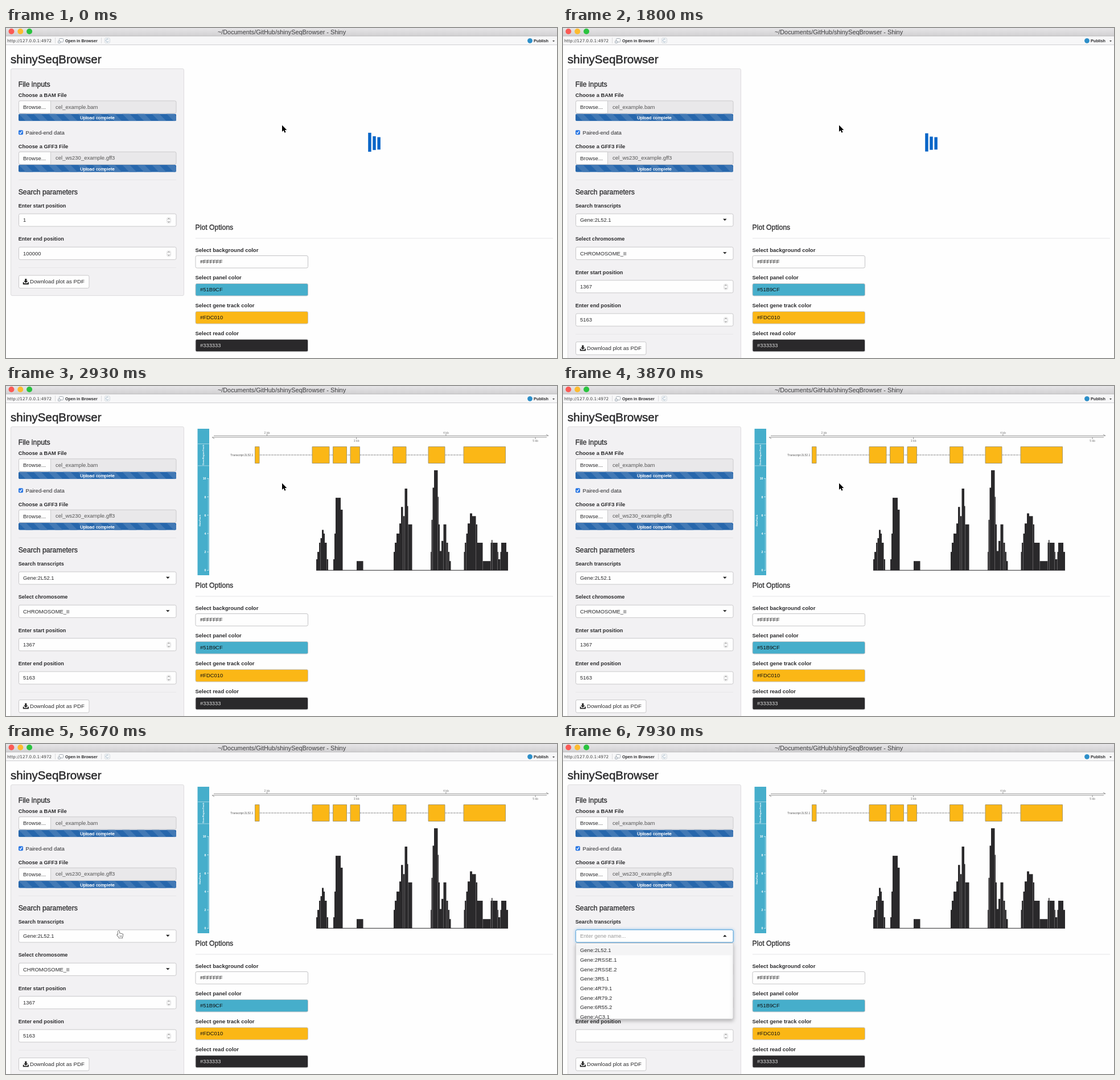
An HTML page with a canvas that plays this animation: 968x579 px, repeating every 8 s.

```html
<!DOCTYPE html>
<html lang="en">
<head>
<meta charset="utf-8">
<title>shinySeqBrowser</title>
<style>
  html, body { margin: 0; width: 100%; height: 100%; overflow: hidden; background: #fefefe; }
  canvas { display: block; }
</style>
</head>
<body>
<canvas id="stage" width="968" height="579"></canvas>
<script>
const ctx = document.getElementById('stage').getContext('2d');
const SANS = '"Liberation Sans", Arial, sans-serif';
const LOOP = 8000;
// Moments (ms) at which the app changes state
const FORM = 470, FILLED = 1330, PLOT = 2740, OPEN = 6400, CLEARED = 7200;
const MOVE_START = 4628, MOVE_END = 5478;

const BLUE = '#46aecb', GOLD = '#fbb716', DARK = '#2a292b', INK = '#2b2b2d';

const GENES = ['2L52.1', '2RSSE.1', '2RSSE.2', '3R5.1', '4R79.1', '4R79.2', '6R55.2', 'AC3.1'];
const EXONS = [[437.5, 445], [538, 568], [574.5, 598.5], [605, 621.5], [679.5, 703], [742, 771], [804, 877.5]];
// Each peak: x, height in reads, x, height, ..., closing x
const PEAKS = [
  [545, 1.2, 547, 2, 550, 3, 552.5, 3.5, 555, 4.4, 558, 4, 560, 3, 563.5, 1.2, 566],
  [575, 1.2, 577, 4, 579, 7.9, 588, 6.6, 591.5],
  [616, 1, 627.5],
  [681, 2, 683, 3, 686, 4, 691, 5.1, 694, 6.9, 697.5, 5.9, 700.5, 8.9, 705, 7, 706.5, 5, 713.5],
  [746, 2, 747.5, 5.5, 749.5, 9, 752, 10.9, 758.5, 8, 760, 5, 762, 2.1, 765, 3.2, 768.5, 5, 773.5, 3, 776.5, 2, 779, 1, 781.5],
  [804.5, 2, 806, 3, 808.5, 4, 811, 5.1, 815, 6.2, 819, 5.9, 825.5, 5, 828, 3, 837.5, 1, 851.5, 3,
   853, 3.3, 854.5, 3, 863.5, 2, 865, 1.2, 868.5, 2, 870, 3, 879, 2, 882]
];

const smooth = u => { u = Math.min(1, Math.max(0, u)); return u * u * (3 - 2 * u); };

function text(str, x, y, size, { color = INK, weight = 400, align = 'left', family = SANS, thicken = 0 } = {}) {
  ctx.font = `${weight} ${size}px ${family}`;
  ctx.textAlign = align;
  ctx.fillStyle = ctx.strokeStyle = color;
  ctx.fillText(str, x, y);
  if (thicken) { ctx.lineWidth = thicken; ctx.strokeText(str, x, y); }
}

function rect(x, y, w, h, color) {
  ctx.fillStyle = color;
  ctx.fillRect(x, y, w, h);
}

function box(x, y, w, h, fill, stroke, radius = 2.5) {
  ctx.beginPath();
  ctx.roundRect(x, y, w, h, radius);
  if (fill) { ctx.fillStyle = fill; ctx.fill(); }
  if (stroke) { ctx.strokeStyle = stroke; ctx.lineWidth = 1; ctx.stroke(); }
}

function line(points, color, width = 1) {
  ctx.beginPath();
  points.forEach(([x, y]) => ctx.lineTo(x, y));
  ctx.strokeStyle = color;
  ctx.lineWidth = width;
  ctx.stroke();
}

function shape(points, color) {
  ctx.beginPath();
  points.forEach(([x, y]) => ctx.lineTo(x, y));
  ctx.fillStyle = color;
  ctx.fill();
}

function disc(x, y, r, color) {
  ctx.beginPath();
  ctx.arc(x, y, r, 0, 7);
  ctx.fillStyle = color;
  ctx.fill();
}

// dir 1 points down, -1 points up
const caret = (x, y, w, dir = 1) =>
  shape([[x - w, y - dir * w / 2], [x + w, y - dir * w / 2], [x, y + dir * w / 2]], '#222');

const label = (str, x, y, size = 9.5) => text(str, x, y, size, { weight: 700 });
const heading = (str, x, y, size = 12.25) => text(str, x, y, size, { thicken: size / 40 });

function windowBars() {
  const bar = ctx.createLinearGradient(0, 0, 0, 14);
  bar.addColorStop(0, '#e6e5e7');
  bar.addColorStop(1, '#d1d0d2');
  rect(0, 0, 968, 14, bar);
  rect(0, 14, 968, 15, '#f7f7f8');
  rect(0, 13.5, 968, 1, '#b9b8ba');
  rect(0, 29, 968, 1, '#d0d0d2');
  ['#fb5a55', '#fcbb2f', '#2ac33f'].forEach((c, i) => disc(9.5 + i * 15.8, 6, 5, c));
  text('~/Documents/GitHub/shinySeqBrowser - Shiny', 484.5, 10.5, 10.85, { align: 'center', color: '#3c3c3e' });
  text('http://127.0.0.1:4972', 2, 25, 7.3, { family: '"DejaVu Sans", sans-serif', color: '#444' });
  rect(86, 17, 1, 10, '#dcdcde');
  rect(167, 17, 1, 10, '#dcdcde');
  box(93.5, 18.5, 7, 6, '#fff', '#a3abb3', 1);
  box(91.5, 22.5, 4, 4, '#e4e9ee', '#a3abb3', 1);
  text('Open in Browser', 104, 25, 7.1, { weight: 700 });
  box(173.5, 17.5, 9, 9, '#f4f6f8', '#d5dbe0', 2);
  ctx.beginPath();
  ctx.arc(178, 22, 2.6, 0.4, 5.4);
  ctx.strokeStyle = '#a9bccb';
  ctx.stroke();
  disc(920.5, 22.3, 4.4, '#2d8fc9');
  text('Publish', 927, 25, 7.2, { weight: 700 });
  caret(962, 23, 2);
}

function fileInput(y, name) {
  box(22.5, y, 276.5, 22, '#e9e8ea', '#cbcacc');
  box(22.5, y, 56, 22, '#fefefe', '#cbcacc', [2.5, 0, 0, 2.5]);
  text('Browse...', 30, y + 14.3, 9.55);
  text(name, 87, y + 13.7, 9.5, { color: '#555' });
  const top = y + 22.8, h = 12.7;
  ctx.save();
  ctx.beginPath();
  ctx.roundRect(22, top, 277, h, 2.5);
  ctx.clip();
  rect(22, top, 277, h, '#2767ac');
  for (let x = 22 - 26; x < 299; x += 26)
    shape([[x, top], [x + 13, top], [x + 13 + h, top + h], [x + h, top + h]], '#4279b5');
  ctx.restore();
  text('Upload complete', 160.3, top + 9.4, 8.1, { align: 'center', color: '#fff', thicken: 0.25 });
}

function field(i, title, value, kind, focused) {
  const y = 326 + i * 58.35, mid = y + 11;
  label(title, 21.7, y - 11, 9.15);
  if (focused) {
    ctx.save();
    ctx.shadowColor = 'rgba(102,175,233,.7)';
    ctx.shadowBlur = 5;
    box(22.5, y, 276.5, 22, '#fff', '#62a9dc');
    ctx.restore();
  }
  box(22.5, y, 276.5, 22, '#fefefe', focused ? '#62a9dc' : '#c9c8ca');
  const hint = value.endsWith('...');
  text(value, 30, mid + 3.2, 9.45, { color: hint ? '#999' : INK });
  if (kind === 'select') return caret(284.3, mid - 0.5, 3.3, focused ? -1 : 1);
  box(282.5, mid - 4.5, 7, 10, '#f8f8f8', '#dededf', 3);
  for (const d of [-1, 1])
    line([[284.2, mid + 0.5 + d * 1.8], [286, mid + 0.5 + d * 3.6], [287.8, mid + 0.5 + d * 1.8]], '#666', 0.9);
}

function downloadButton(y) {
  rect(22, y - 14, 277, 1, '#e7e6e8');
  box(22.5, y, 123.5, 22.5, '#fefefe', '#c9c8ca');
  const m = y + 11;
  rect(33.3, m - 5, 3, 4, '#222');
  shape([[31, m - 1.2], [38.6, m - 1.2], [34.8, m + 2.6]], '#222');
  line([[30.7, m + 1], [30.7, m + 4], [39, m + 4], [39, m + 1]], '#222', 1.8);
  text('Download plot as PDF', 42, m + 3.3, 9.65);
}

function sidebar(t) {
  const full = t >= FORM, filled = t >= FILLED && t < CLEARED;
  heading('shinySeqBrowser', 8, 61.5, 20.5);
  box(8.5, 71.5, 304, full ? 515 : 398, '#f2f1f3', '#dddcde');
  heading('File inputs', 21.7, 102.5);
  label('Choose a BAM File', 21.7, 121, 9.4);
  fileInput(127.8, 'cel_example.bam');
  box(22, 179.3, 8, 8, '#2b78e4', null, 1.8);
  line([[23.8, 183.4], [25.4, 185.2], [28.2, 181.2]], '#fff', 1.2);
  text('Paired-end data', 34.5, 186.5, 9.6);
  label('Choose a GFF3 File', 21.7, 210.5, 9.4);
  fileInput(217.3, 'cel_ws230_example.gff3');
  rect(22, 266, 277, 1, '#e7e6e8');
  heading('Search parameters', 21.7, 291.5);
  if (!full) {
    field(0, 'Enter start position', '1');
    field(1, 'Enter end position', '100000');
    return downloadButton(434);
  }
  field(0, 'Search transcripts', t < CLEARED ? 'Gene:2L52.1' : 'Enter gene name...', 'select', t >= OPEN);
  field(1, 'Select chromosome', t < FILLED ? 'CHROMOSOME_I' : 'CHROMOSOME_II', 'select');
  field(2, 'Enter start position', filled ? '1367' : '');
  field(3, 'Enter end position', filled ? '5163' : '');
  downloadButton(550.7);
  if (t >= OPEN) dropdown();
}

function dropdown() {
  ctx.save();
  ctx.shadowColor = 'rgba(0,0,0,.25)';
  ctx.shadowBlur = 6;
  ctx.shadowOffsetY = 3;
  box(22.5, 349.5, 276.5, 133, '#fefefe', '#cfced0', [0, 0, 2.5, 2.5]);
  ctx.restore();
  ctx.save();
  ctx.beginPath();
  ctx.rect(23, 350, 275.5, 132.3);
  ctx.clip();
  rect(23, 353.5, 275.5, 17, '#f4f4f5');
  GENES.forEach((g, i) => text('Gene:' + g, 30, 365.3 + i * 16.65, 9.45));
  ctx.restore();
}

function plotOptions() {
  heading('Plot Options', 332.5, 353.5);
  rect(333, 368.5, 628, 1, '#e6e6e7');
  [['background', '#fefefe', '#FFFFFF'], ['panel', BLUE, '#51B9CF'],
   ['gene track', GOLD, '#FDC010'], ['read', DARK, '#333333']].forEach(([name, fill, code], i) => {
    const y = 399.5 + i * 48.95;
    label(`Select ${name} color`, 332.5, y - 7, 9.5);
    box(333, y, 197.5, 21.5, fill, '#c4c4c6');
    text(code, 341, y + 13.7, 9.4, { color: fill === DARK ? '#dcdcdc' : '#111' });
  });
}

function loader(t) {
  const em = 5.45, top = 191.5;
  const lead = t < FORM ? 0.255 + t / 1000 : 0.56 + (t - 1070) / 1087;
  for (let i = 0; i < 3; i++) {
    const phase = (lead - i * 0.16 + 2) % 1;
    const grow = smooth(1 - Math.abs(phase - 0.4) / 0.4);
    rect(636.2 + i * 8.1, top - 2 * em * grow, em, em * (4 + 3 * grow), '#0a66c8');
  }
}

function sideText(str, x, y, size) {
  ctx.save();
  ctx.translate(x, y);
  ctx.rotate(-Math.PI / 2);
  text(str, 0, 0, size, { color: '#fff', align: 'center', weight: 700 });
  ctx.restore();
}

function plot() {
  const gray = '#8c8c8c', base = 323.3, unit = 16.1;
  rect(336.5, 75, 20.5, 257, BLUE);
  rect(336.5, 101, 20.5, 0.8, '#b5dde9');
  rect(336.5, 139.5, 20.5, 0.8, '#b5dde9');
  sideText('GeneRegionTrack', 347.5, 121, 4.2);
  sideText('DataTrack', 341.5, 236, 4.2);
  line([[355.5, base], [355.5, base - 10 * unit]], '#d8eef4', 0.6);
  for (let n = 0; n <= 10; n += 2) {
    const y = base - n * unit;
    rect(353.5, y - 0.4, 2.5, 0.8, '#fff');
    text(n, 351.5, y + 2, 5.2, { color: '#fff', align: 'right', weight: 700 });
  }

  line([[949, 85], [953, 87.3], [365, 87.3]], gray, 0.9);
  line([[366, 92.3], [362, 90], [950, 90]], gray, 0.9);
  for (let kb = 2; kb <= 5; kb++) {
    const x = 458.5 + (kb - 2) * 157.2, up = kb % 2 === 0;
    line([[x, up ? 84.3 : 90], [x, up ? 87.3 : 93]], gray);
    text(kb + ' kb', x, up ? 83.5 : 98, 5.2, { color: '#777', align: 'center' });
  }

  text('Transcript:2L52.1', 434.5, 123, 5.2, { color: '#555', align: 'right' });
  line([[445, 121], [804, 121]], '#999', 0.7);
  for (let x = 448; x < 802; x += 5)
    line([[x - 1, 119.8], [x + 0.6, 121], [x - 1, 122.2]], '#999', 0.6);
  for (const [a, b] of EXONS) box(a, 106.5, b - a, 29, GOLD, '#a89a70', 0);

  rect(545, base - 0.5, 337, 1, DARK);
  for (const p of PEAKS)
    for (let i = 0; i + 2 < p.length; i += 2)
      rect(p[i], base - p[i + 1] * unit, p[i + 2] - p[i], p[i + 1] * unit, DARK);
}

const ARROW = new Path2D('M0 0V11.6L2.7 9.1L4.5 13.2L6.5 12.3L4.7 8.4H8.3Z');
const HAND = new Path2D('M-1 1Q0-.6 1.2 1V5Q2.6 4 3.5 5.2Q4.8 4.6 5.6 5.8Q7.6 5.4 7.6 7.4Q7.6 10 6.4 11.4V13H.4V12' +
  'L-2.8 7.8Q-3.4 6 -1 7Z');

function pointer(t) {
  if (t >= CLEARED) return;
  const k = smooth((t - MOVE_START) / (MOVE_END - MOVE_START));
  const x = 485 - 287 * k, y = 170.5 + 157 * k;
  const hand = x < 299 && y > 325;
  ctx.save();
  ctx.translate(x, y);
  ctx.lineJoin = 'round';
  ctx.fillStyle = hand ? '#fff' : '#000';
  ctx.strokeStyle = hand ? '#222' : '#fff';
  ctx.lineWidth = hand ? 1.1 : 1.6;
  const path = hand ? HAND : ARROW;
  ctx.stroke(path);
  ctx.fill(path);
  if (hand) for (const dx of [2, 3.7, 5.4]) line([[dx, 8.5], [dx, 11]], '#444', 0.6);
  ctx.restore();
}

function draw(now) {
  const t = now % LOOP;
  rect(0, 0, 968, 579, '#fefefe');
  windowBars();
  sidebar(t);
  plotOptions();
  t < PLOT ? loader(t) : plot();
  pointer(t);
  requestAnimationFrame(draw);
}

const start = performance.now();
const tick = draw;
draw = now => tick(Math.max(0, now - start));
draw(start);
</script>
</body>
</html>
```
